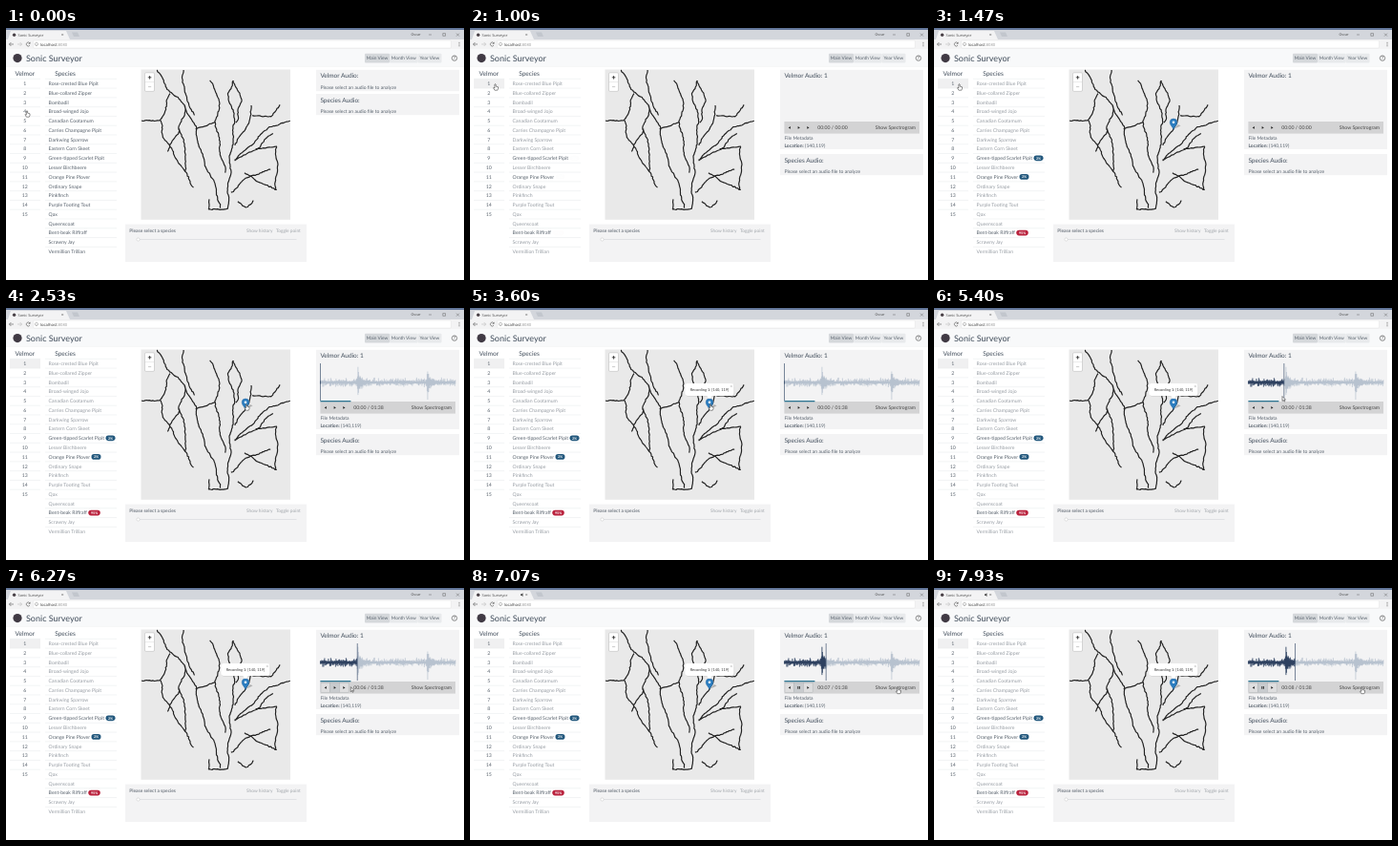
Recreate the animation shown at these times as an HTML page. Size 480 by 264 pixels, loop 8000 ms.

```html
<!DOCTYPE html>
<html lang="en">
<head>
<meta charset="utf-8">
<title>Sonic Surveyor</title>
<style>
html, body { margin: 0; width: 100%; height: 100%; overflow: hidden; background: #fff; }
svg { display: block; width: 100%; height: 100%; font-family: Lato, "Open Sans", sans-serif; text-rendering: geometricPrecision; }
</style>
</head>
<body>
<svg id="stage" viewBox="0 0 480 264"></svg>
<script>
const LOOP = 8000, LOAD = 1000, WAVE = 1800, POPUP = 3400, SEEK = 5200, PLAY = 6070, SOUND = 6400;
const INK = '#56606b', DARK = '#414d5b', FADED = '#969ca3', PANEL = '#f3f3f4';
const WAVE_X = 329.4, WAVE_END = 471, PX_PER_SECOND = 6.2;
const MID = 'text-anchor="middle"', BOLD = 'font-weight="700"';
const SVG_NS = 'http://www.w3.org/2000/svg';
const stage = document.getElementById('stage');
const $ = id => document.getElementById(id);

let seed = 7;
const rand = () => (seed = (seed * 16807) % 2147483647) / 2147483647;
const clamp = v => Math.max(0, Math.min(1, v));
const ease = v => v * v * (3 - 2 * v);

const rect = (x, y, w, h, fill, more = '') =>
  `<rect x="${x}" y="${y}" width="${w}" height="${h}" fill="${fill}" ${more}/>`;
const line = (d, stroke, width = 0.6, more = '') =>
  `<path d="${d}" fill="none" stroke="${stroke}" stroke-width="${width}" ${more}/>`;
const text = (x, y, s, size = 5.15, fill = INK, more = '') =>
  `<text x="${x}" y="${y}" font-size="${size}" fill="${fill}" ${more}>${s}</text>`;
const group = (id, body) => `<g id="${id}">${body}</g>`;

function browser() {
  const sans = 'font-family="Open Sans, sans-serif"';
  return rect(0, 0, 480, 12, '#d3d6dc') + rect(0, 0, 480, 2, '#64779a')
    + `<path d="M2 12L5 3H63L67 12Z" fill="${PANEL}"/>`
    + '<circle cx="8.6" cy="7.2" r="1.7" fill="#4a4248"/>'
    + text(12.5, 8.6, 'Sonic Surveyor', 3.9, '#444', sans)
    + group('speaker', '<path d="M53 6.3H54.1L55.5 5.2V9L54.1 7.9H53Z" fill="#555"/>')
    + line('M58.2 6L60.2 8M60.2 6L58.2 8', '#555', 0.45)
    + '<path d="M69 4.5H75L77 9H71Z" fill="#c2c6cd"/>'
    + text(424.5, 8.2, 'Oscar', 3.7, '#444', sans)
    + line('M443 7H446M457.8 5.6H460.5V8.3H457.8ZM472 5.6L475 8.6M475 5.6L472 8.6', '#555', 0.45)
    + rect(0, 12, 480, 10, PANEL)
    + rect(28.5, 13, 438, 8, '#fff', 'rx="1" stroke="#d9d9d9" stroke-width=".35"')
    + line('M8 17H3.4M5.4 15L3.4 17L5.4 19', '#555')
    + line('M12 17H16.6M14.6 15L16.6 17L14.6 19', '#bbb')
    + line('M25 16A2 2 0 1 0 25 18M25.2 14.8V16.4H23.6', '#555')
    + line('M32 15.2A1.7 1.7 0 1 1 31.9 15.2M32 16.6V18.2', '#666', 0.4)
    + text(36, 18.5, 'localhost:<tspan fill="#999">8080</tspan>', 4.2, '#333', sans)
    + [15.2, 17, 18.8].map(y => `<circle cx="475" cy="${y}" r=".5" fill="#555"/>`).join('');
}

function header() {
  const view = (s, x, w, fill) => rect(x, 26.8, w, 9.8, fill, 'rx="1"') + text(x + w / 2, 33.3, s, 4.8, INK, MID);
  return rect(0, 22, 480, 18.5, '#f8f9fa') + line('M0 40.5H480', '#ececec', 0.4)
    + '<circle cx="12" cy="31.6" r="4.6" fill="#403a44"/>'
    + text(21, 34.7, 'Sonic Surveyor', 9, DARK)
    + view('Main View', 376, 26, '#d5d8db') + view('Month View', 402, 29.5, '#e8eaec')
    + view('Year View', 431.5, 25, '#e8eaec')
    + '<circle cx="470" cy="31.6" r="2.7" fill="none" stroke="#444" stroke-width=".6"/>'
    + text(470, 33.3, '?', 4.6, '#444', MID);
}

const SPECIES = ['Rose-crested Blue Pipit', 'Blue-collared Zipper', 'Bombadil', 'Broad-winged Jojo',
  'Canadian Cootamum', 'Carries Champagne Pipit', 'Darkwing Sparrow', 'Eastern Corn Skeet',
  'Green-tipped Scarlet Pipit', 'Lesser Birchbeere', 'Orange Pine Plover', 'Ordinary Snape',
  'Pinkfinch', 'Purple Tooting Tout', 'Qax', 'Queenscoat', 'Bent-beak Riffraff', 'Scrawny Jay',
  'Vermillion Trillian'];
const MATCHES = { 8: '2%', 10: '2%', 16: '95%' };
const rowY = i => 58.2 + i * 9.78;

function tables() {
  const rows = SPECIES.map((name, i) => {
    const y = rowY(i), top = y - 4.9, numbered = i < 15;
    return line(`M41 ${top}H116` + (numbered ? `M4 ${top}H36` : ''), '#dfe2e5', 0.4)
      + (numbered ? text(19.8, y + 1.8, i + 1, 5.15, INK, MID) : '')
      + text(44.6, y + 1.8, name, 5.15, INK, `id="name${i}" ${MATCHES[i] ? '' : 'class="other"'}`);
  });
  return rect(4, 53.4, 32, 9.7, '#f0f0f1', 'id="rowHover"')
    + text(19.8, 50.2, 'Velmor', 6.6, DARK, MID) + text(62, 50.2, 'Species', 6.6, DARK, MID)
    + rows.join('') + group('badges', '');
}

// Badges sit right after the species names.
function badges() {
  return Object.entries(MATCHES).map(([i, s]) => {
    const x = 46 + $('name' + i).getComputedTextLength(), w = 5 + s.length * 2.5, y = rowY(+i);
    return rect(x, y - 2.9, w, 5.6, s.length > 2 ? '#b9223d' : '#23587d', 'rx="2.8"')
      + text(x + w / 2, y + 1.3, s, 3.7, '#fff', MID + BOLD);
  }).join('');
}

// Key points of each road; the bends between them come from noise.
const ROADS = [
  '158 44 170 64 188 82 199 106 205 134 221 170 225 190', '186 44 186 66 198 92',
  '142 97 162 97 172 68', '162 97 166 116 182 142 197 168',
  '188 82 182 106 189 132 187 152', '182 106 169 130',
  '214 55 224 74 220 98 224 125 230 153', '199 106 220 98',
  '238 55 233 68 240 100 236 125 232 190 211 190 213 178', '238 55 247 76 241 100',
  '257 81 258 92 240 123', '258 92 279 93 287 79',
  '298 97 276 104 239 139', '280 110 262 127 239 139',
  '262 127 284 124 283 170 267 162 249 151', '277 148 254 156 235 173', '243 182 253 188 260 180'
];

function road(points) {
  const path = document.createElementNS(SVG_NS, 'path');
  path.setAttribute('d', 'M' + points);
  const length = path.getTotalLength(), phase = rand() * 6;
  let d = '';
  for (let s = 0; s <= length; s += 1.8) {
    const p = path.getPointAtLength(s);
    const bend = Math.sin(s / 5 + phase) * Math.min(1, s / 6, (length - s) / 6);
    d += `${d ? 'L' : 'M'}${(p.x + bend * 1.2 + rand() - 0.5).toFixed(1)} ${(p.y + rand() - 0.5).toFixed(1)}`;
  }
  return d;
}

function map() {
  return rect(141.5, 43.5, 156.5, 157.3, '#e9e9e9')
    + line(ROADS.map(road).join(''), '#222', 1.2, 'stroke-linejoin="round"')
    + rect(145.5, 46.8, 10, 19.6, '#fff', 'rx="1.3" stroke="#bdbdbd" stroke-width=".6"')
    + line('M145.5 56.6H155.5', '#ccc', 0.4)
    + line('M148.8 51.8H152.4M150.6 50V53.6', '#222', 0.8) + line('M149 61.6H152.2', '#bbb', 0.8)
    + group('pin', '<path d="M251 106L256 101L258.5 102.5Z" fill="#777" opacity=".5"/>'
      + '<path d="M251 106.3C250 103.4 247.2 101.8 247.2 98.8A3.8 3.8 0 0 1 254.8 98.8C254.8 101.8 252 103.4 251 106.3Z" fill="#2b7dc0" stroke="#2468a5" stroke-width=".5"/>'
      + '<circle cx="251" cy="98.8" r="1.3" fill="#fff"/>')
    + group('popup', rect(225.6, 79.8, 51.5, 12.8, '#888', 'rx="3" opacity=".35"')
      + '<path d="M248 91.8H254L251 95.2Z" fill="#fff"/>' + rect(225.2, 79, 51.4, 13, '#fff', 'rx="3"')
      + text(251, 87.1, 'Recording 1: [140, 119]', 3.95, '#333', MID)
      + line('M272.9 81.1L274.7 82.9M274.7 81.1L272.9 82.9', '#aaa', 0.5));
}

function timeline() {
  return rect(125, 205.6, 190, 39.4, PANEL)
    + text(129.2, 213.5, 'Please select a species', 4.9, '#747b84', BOLD)
    + text(252, 213.5, 'Show history', 4.8, '#a0a5aa') + text(283, 213.5, 'Toggle point', 4.8, '#a0a5aa')
    + line('M137 221.5H304.5', '#dcdee0', 0.8)
    + '<circle cx="138.5" cy="221.5" r="1.6" fill="#fff" stroke="#c4c4c4" stroke-width=".5"/>';
}

// Quiet noise with two sharp calls, each ringing off to the right.
function wavePath() {
  const call = (x, at, peak) => x < at ? peak * Math.exp((x - at) * 2)
    : peak * (0.65 * Math.exp((at - x) * 1.5) + 0.35 * Math.exp((at - x) / 4));
  let d = '';
  for (let x = WAVE_X; x < WAVE_END; x += 0.5) {
    const loud = call(x, 368.8, 18) + call(x, 441.8, 18);
    const amp = () => 0.9 + rand() * rand() * 4.5 + loud * (0.5 + rand() * 0.5);
    d += `M${x.toFixed(1)} ${(78 - amp()).toFixed(1)}V${(78 + amp()).toFixed(1)}`;
  }
  return d;
}

function player() {
  const wave = wavePath(), prompt = 'Please select an audio file to analyze';
  const tri = (x, dir) => `<path d="M${x - dir} 103L${x + dir * 1.2} 104.4L${x - dir} 105.8Z" fill="#222"/>`;
  const empty = rect(325, 43.8, 150, 22.4, PANEL) + text(WAVE_X, 63.7, prompt, 5);
  const loaded = rect(325, 43.8, 150, 83.2, PANEL) + rect(WAVE_X, 98, WAVE_END - WAVE_X, 12.6, '#d3d3d4')
    + group('wave', line(wave, '#a0aec0', 0.5)
      + line(wave, '#14284a', 0.65, 'clip-path="url(#heard)"')
      + rect(WAVE_X, 97, 32, 1.3, '#2d7592')
      + rect(WAVE_X, 58, 0.6, 39, '#263c5c', 'id="playhead"'))
    + group('buttons', [0, 1, 2].map(i => rect(330 + i * 9.7, 99.5, 9.7, 9.7, i === 1 ? '#c8cbce' : '#dededf',
      'stroke="#a5a9ad" stroke-width=".35"')).join(''))
    + tri(334.9, -1) + group('playIcon', tri(344.6, 1))
    + group('pauseIcon', line('M343.8 103V105.8M345.4 103V105.8', '#222', 0.9)) + tri(354.3, 1)
    + text(364.3, 106.2, '', 5.15, '#444', 'id="clock"')
    + text(467, 106.2, 'Show Spectrogram', 5.15, '#444', 'text-anchor="end"')
    + text(WAVE_X, 117.4, 'File Metadata', 5)
    + text(WAVE_X, 125.3, `<tspan ${BOLD}>Location:</tspan> (140,119)`, 5);
  return '<clipPath id="heard"><rect id="heardBox" x="329" y="55" width="0" height="45"/></clipPath>'
    + group('empty', empty) + group('loaded', loaded)
    + text(WAVE_X, 52.3, '', 6.5, DARK, 'id="audioTitle"')
    + group('speciesAudio', rect(325, 69, 150, 22.2, PANEL)
      + text(WAVE_X, 77.8, 'Species Audio:', 6.5, DARK) + text(WAVE_X, 89.1, prompt, 5));
}

function pointer() {
  const style = 'fill="#fff" stroke="#222" stroke-width=".5" stroke-linejoin="round"';
  return group('pointer', `<path id="arrow" d="M0 0V5L1.2 3.9L2 5.6L2.8 5.2L2 3.6H3.5Z" ${style}/>`
    + `<path id="hand" d="M-.6 0Q0 -.8 .6 0V2.1L3 2.8V4.6L2.3 6.2H-.6L-2 3.8L-1.5 3.2L-.6 3.9Z" ${style}/>`);
}

const MOVES = [
  { from: 70, to: 70, x: 22, y: 87, link: true },
  { from: 270, to: 530, x: 26.5, y: 59, link: true },
  { from: 1730, to: 1870, x: 184, y: 152 },
  { from: 2070, to: 2500, x: 252, y: 101, link: true },
  { from: 4130, to: 4270, x: 283, y: 102 },
  { from: 4530, to: 5000, x: 365, y: 92.5 },
  { from: 5430, to: 5930, x: 345, y: 103.5, link: true },
  { from: 6070, to: 6870, x: 448.5, y: 104.5, link: true }
];

function pointerAt(t) {
  let { x, y, link } = MOVES[0];
  for (const move of MOVES) {
    if (t < move.from) break;
    const k = move.to > move.from ? ease(clamp((t - move.from) / (move.to - move.from))) : 1;
    x += (move.x - x) * k;
    y += (move.y - y) * k;
    link = move.link && k === 1;
  }
  return { x, y, link };
}

stage.innerHTML = rect(0, 0, 480, 264, '#fff') + browser() + header() + tables() + map()
  + timeline() + player() + pointer();
$('badges').innerHTML = badges();
const others = stage.querySelectorAll('.other');
const set = (id, name, value) => $(id).setAttribute(name, value);
const show = (id, on) => set(id, 'display', on ? 'inline' : 'none');

function draw(t) {
  const loaded = t >= LOAD, playing = t >= PLAY, audible = t >= SOUND;
  const fade = clamp((t - LOAD) / 350);

  show('empty', !loaded);
  show('loaded', loaded);
  $('audioTitle').textContent = loaded ? 'Velmor Audio: 1' : 'Velmor Audio:';
  set('speciesAudio', 'transform', `translate(0 ${loaded ? 63 : 0})`);
  show('rowHover', t >= 430);
  others.forEach(el => el.setAttribute('fill', loaded ? FADED : INK));
  set('badges', 'opacity', fade);
  set('pin', 'opacity', fade);
  set('popup', 'opacity', clamp((t - POPUP) / 200));

  const seconds = t < SEEK ? 0 : 6 + Math.max(0, t - PLAY) / 1000;
  const head = WAVE_X + seconds * PX_PER_SECOND;
  show('wave', t >= WAVE);
  set('playhead', 'x', head);
  set('heardBox', 'width', head - 329);
  $('clock').textContent = `00:0${playing ? Math.round(seconds) : 0} / ${t >= WAVE ? '01:38' : '00:00'}`;
  show('buttons', playing);
  show('playIcon', !audible);
  show('pauseIcon', audible);
  show('speaker', audible);

  const { x, y, link } = pointerAt(t);
  show('arrow', !link);
  show('hand', link);
  set('pointer', 'transform', `translate(${x.toFixed(2)} ${y.toFixed(2)})`);
}

const start = performance.now();
function tick() {
  draw((performance.now() - start) % LOOP);
  requestAnimationFrame(tick);
}
tick();
</script>
</body>
</html>
```
